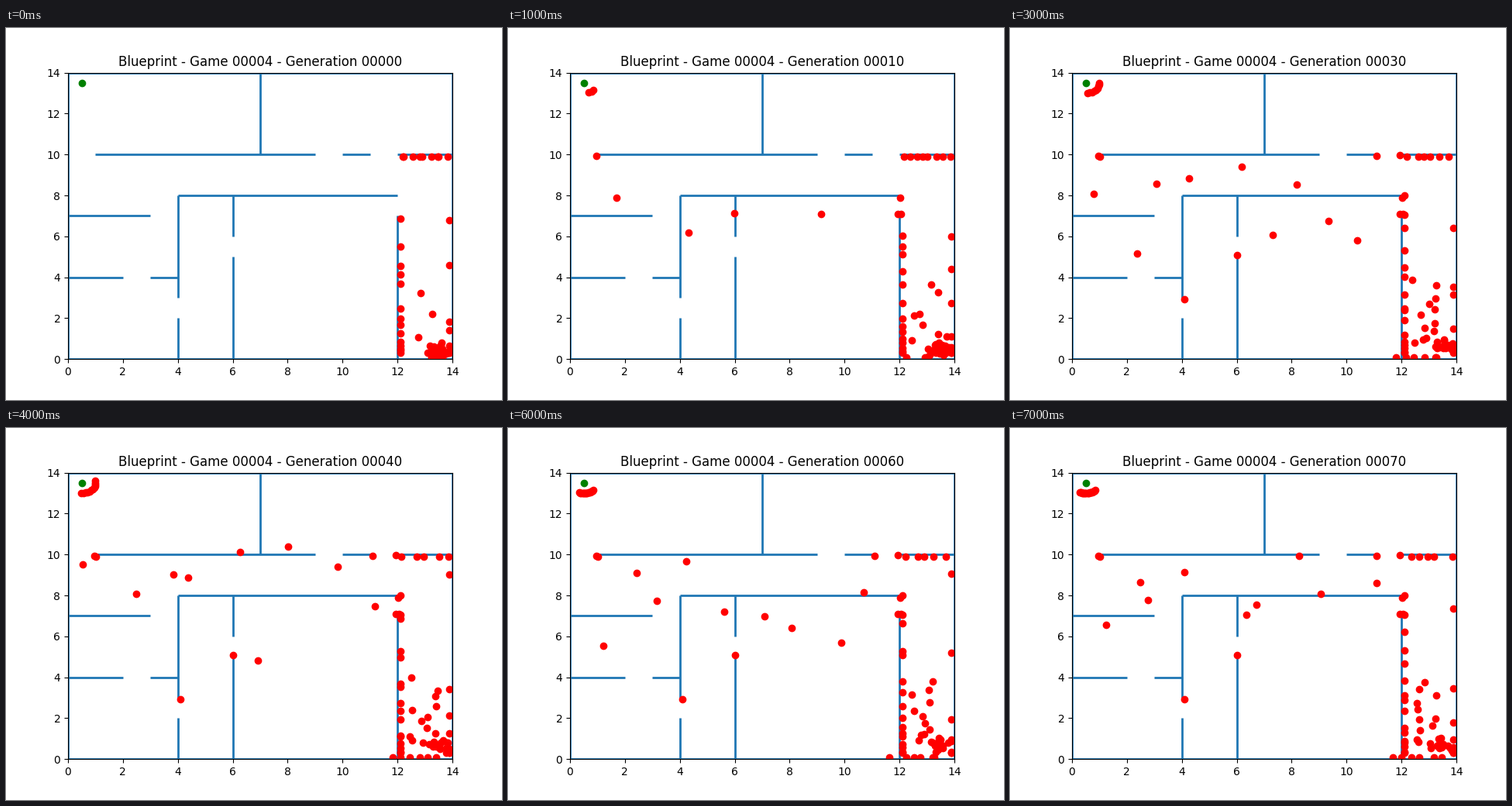
A matplotlib script for the animation above (8 s loop, 640 by 480 pixels).

```python
import numpy as np
import matplotlib.pyplot as plt
from matplotlib.animation import FuncAnimation

SIZE = 14
GENERATIONS = 8
GAP = 0.1      # dots stop this far from a wall
REACH = 0.5    # dots stop this far from the goal
GOAL = np.array([0.5, 13.5])

# x0, y0, x1, y1
WALLS = [
    (0, 0, 14, 0), (14, 0, 14, 14), (14, 14, 0, 14), (0, 14, 0, 0),
    (7, 10, 7, 14), (1, 10, 9, 10), (10, 10, 11, 10), (12, 10, 14, 10),
    (0, 7, 3, 7), (0, 4, 2, 4), (3, 4, 4, 4), (4, 0, 4, 2), (4, 3, 4, 8),
    (4, 8, 12, 8), (6, 8, 6, 6), (6, 5, 6, 0), (12, 0, 12, 7),
]

# Wall ends where dots get stuck, in the order they are discovered
LEDGES = [
    (12.05, 7.1), (11.95, 7.1), (12.03, 7.9), (0.95, 9.93),
    (12.1, 8.0), (12.1, 7.07), (1.02, 9.9), (11.1, 9.95),
    (6.0, 5.1), (4.08, 2.92), (11.95, 9.97),
]


def steps(rng, count, low, high, power=1):
    """Jittered even steps from low to high, denser near low."""
    u = (np.arange(count) + rng.random(count)) / count
    return low + (high - low) * u ** power


def points(x, y):
    return np.column_stack(np.broadcast_arrays(x, y))


def cloud(rng, count, centre, spread):
    return rng.normal(centre, spread, (count, 2))


def finishers(i):
    """Dots on an arc around the goal, which turns as they improve."""
    first = -60 - 8 * i
    last = -45 + 65 * np.exp(-(i - 3.6) ** 2)
    a = np.radians(np.linspace(first, last, 3 * i))
    return GOAL + REACH * points(np.cos(a), np.sin(a))


def swarm(i):
    rng = np.random.default_rng([5, i])
    learned = min(i, 2) / 2    # how far the swarm has left the start
    groups = [
        points(12 + GAP, steps(rng, 14, 0.3, 6.9, 2)),
        points(SIZE - GAP, steps(rng, 8, 0.3, 9.8, 4)),
        points(steps(rng, 9 - min(i, 4), 12, 13.9), 10 - GAP),
        points(steps(rng, int(6 * learned), 11.6, 13.6), GAP),
        # around the start, and on the way up the shaft
        cloud(rng, int(45 - 32 * learned),
              (13.5, 0.35 + 0.35 * learned), (0.2, 0.18)),
        points(rng.uniform(12.4, 13.5, int(3 + 9 * learned)),
               steps(rng, int(3 + 9 * learned), 0.8, 4, 1.5)),
        # along the hall
        points(steps(rng, int(9 * learned), 0.2, 11.5),
               rng.normal(7.8, 1.2, int(9 * learned))),
        finishers(i),
    ]
    if i:
        groups.append(LEDGES[:4 * i])
    return np.vstack(groups).clip(GAP, SIZE - GAP)


swarms = [swarm(i) for i in range(GENERATIONS)]

fig, ax = plt.subplots(figsize=(6.4, 4.8), dpi=100)
ax.set(xlim=(0, SIZE), ylim=(0, SIZE),
       xticks=range(0, SIZE + 1, 2), yticks=range(0, SIZE + 1, 2))
for x0, y0, x1, y1 in WALLS:
    ax.plot([x0, x1], [y0, y1], color="tab:blue", lw=2,
            solid_capstyle="butt")
ax.scatter(*GOAL, color="green", zorder=2)
dots, = ax.plot([], [], "o", color="red")
title = ax.set_title("")


def draw(i):
    dots.set_data(*swarms[i].T)
    title.set_text(f"Blueprint - Game 00004 - Generation {10 * i:05d}")
    return dots, title


anim = FuncAnimation(fig, draw, frames=GENERATIONS, interval=1000,
                     repeat=True, repeat_delay=0)
plt.show()
```
